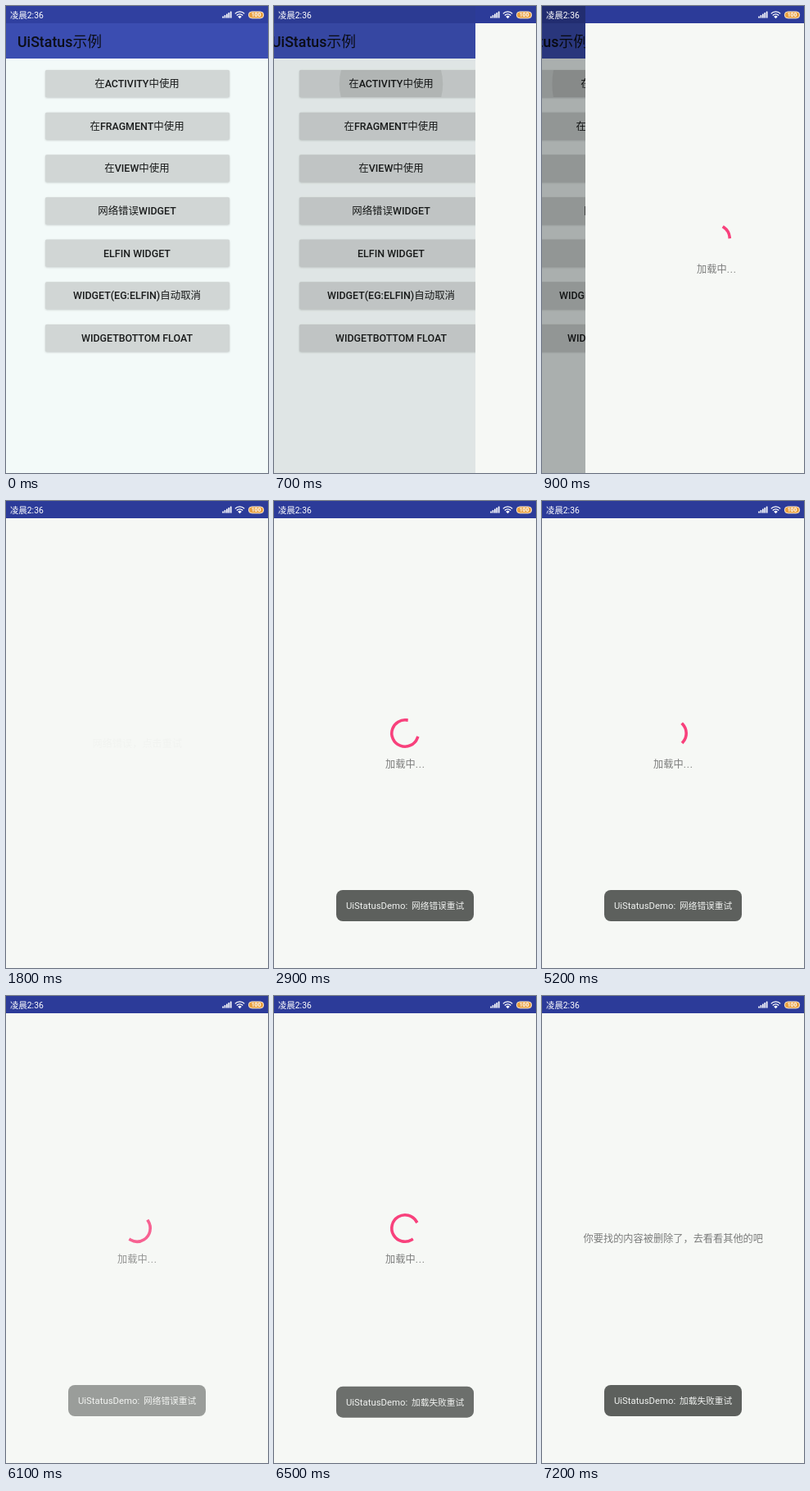
Write an HTML page that moves like this. It is 320 px wide and 569 px high and loops after 8 s.

```html
<!DOCTYPE html>
<html lang="zh-CN">
<head>
<meta charset="utf-8">
<title>UiStatus</title>
<style>
  html, body { margin: 0; width: 100%; height: 100%; overflow: hidden; background: #f6f8f5; }
  svg { display: block; width: 100vw; height: 100vh; }
  text { font-family: Roboto, "Noto Sans CJK SC", "Noto Sans CJK", sans-serif; white-space: pre; }
  .mid { text-anchor: middle; }
  .thin { font-weight: 400; }
  .btn { font-size: 12.44px; font-weight: 500; fill: #1a1c1c; }
  .note { font-size: 12.2px; fill: #7c7d7c; text-anchor: middle; }
  .dots { letter-spacing: .8px; }
  .toast text { font-size: 11.35px; fill: #f0f2f0; }
  .toast .zh { font-size: 10.7px; }
</style>
</head>
<body>
<svg viewBox="0 0 320 569" preserveAspectRatio="none">
  <defs>
    <clipPath id="firstBtn"><rect x="48" y="78" width="225" height="33" rx="1.5"/></clipPath>
    <filter id="soft" x="-5%" y="-20%" width="110%" height="150%"><feGaussianBlur stdDeviation="1"/></filter>
  </defs>

  <g id="list">
    <rect width="400" height="569" fill="#f3faf9"/>
    <rect width="400" height="21" fill="#3040a0"/>
    <rect y="21" width="400" height="43" fill="#3b4db1"/>
    <text x="14" y="49.5" font-size="17.78" font-weight="500" fill="#0c0e18">UiStatus<tspan class="thin">示例</tspan></text>
    <g id="buttons"></g>
    <g clip-path="url(#firstBtn)"><circle id="ripple" cx="160" cy="95" fill="#000"/></g>
  </g>
  <rect id="dim" width="320" height="569"/>

  <g id="page">
    <rect width="320" height="569" fill="#f6f8f5"/>
    <rect width="320" height="21" fill="#2c3b99"/>
    <g id="loading">
      <circle id="arc" r="16.2" pathLength="360" fill="none" stroke="#f8417c" stroke-width="3.6" stroke-linecap="square"/>
      <text class="note" x="160.4" y="325.3">加载中<tspan class="dots">...</tspan></text>
    </g>
    <text id="note" class="note" x="160.3" y="300"></text>
  </g>

  <g id="status" fill="#fff">
    <text x="5" y="14.8" font-size="10.4">凌晨2:36</text>
    <g id="bars"></g>
    <path d="M279.8 9.4a7.6 7.6 0 0 1 11.4 0M281.8 11.5a5 5 0 0 1 7.4 0" fill="none" stroke="#fff" stroke-width="1.4"/>
    <path d="M283.2 12.9a3.2 3.2 0 0 1 4.6 0l-2.3 2.3z"/>
    <rect x="296.3" y="6.9" width="18.4" height="8" rx="4" fill="#e9a140" stroke="#f6e6d0" stroke-width="1"/>
    <text class="mid" x="305.5" y="13.4" font-size="6.8" font-weight="700">100</text>
  </g>

  <g id="toast" class="toast">
    <rect x="76" y="474" width="168" height="38" rx="8" fill="#5d605d"/>
    <text x="88" y="497">UiStatusDemo:</text>
    <text id="toastText" class="zh" x="168" y="497"></text>
  </g>
  <circle id="touch" r="10.3" fill="#fff" fill-opacity=".75" stroke="#cfd1e6" stroke-width="1.3"/>
</svg>

<script>
const LOOP = 8000, FADE = 350;
const $ = id => document.getElementById(id);
const set = (id, attrs) => { for (const k in attrs) $(id).setAttribute(k, attrs[k]); };
const clamp = v => Math.min(1, Math.max(0, v));
const span = (t, start, length) => clamp((t - start) / length);
const smooth = p => (1 - Math.cos(Math.PI * p)) / 2;

const labels = ['在ACTIVITY中使用', '在FRAGMENT中使用', '在VIEW中使用', '网络错误WIDGET',
  'ELFIN WIDGET', 'WIDGET(EG:ELFIN)自动取消', 'WIDGETBOTTOM FLOAT'];
const thinHan = label => label.replace(/[\u4e00-\u9fff]+/g, '<tspan class="thin">$&</tspan>');
$('buttons').innerHTML = labels.map((label, i) => {
  const y = 78 + i * 51.65;
  return `<rect x="48" y="${y + .8}" width="225" height="33.2" rx="2" fill="#8d9291" opacity=".45" filter="url(#soft)"/>
    <rect x="48" y="${y}" width="225" height="33" rx="1.5" fill="#d1d6d5"/>
    <text class="btn mid" x="160" y="${y + 21.1}">${thinHan(label)}</text>`;
}).join('');
$('bars').innerHTML = [0, 1, 2, 3, 4].map(i =>
  `<rect x="${264.2 + i * 2.4}" y="${12.6 - i * 1.5}" width="1.7" height="${2 + i * 1.5}"/>`).join('');

// Each session: loading begins, then the result replaces it.
const sessions = [
  { start: 750, end: 1760, note: '网络错误，点击重试' },
  { start: 2420, end: 3440, note: '加载失败，点击重试' },
  { start: 4240, end: 5250, note: '这里空空如也，去看看其他的吧' },
  { start: 5850, end: 6850, note: '你要找的内容被删除了，去看看其他的吧' }
];
const toasts = [
  { start: 2440, end: 5950, text: '网络错误重试' },
  { start: 6310, end: LOOP, text: '加载失败重试' }
];
const touches = [
  { at: 300, until: 430, x: 160, y: 95 },
  ...sessions.slice(1).map(s => ({ at: s.start - 60, until: s.start + 40, x: 133.7, y: 288.8 }))
];

// cubic-bezier(.4, 0, .2, 1), solved by bisection
function standard(x) {
  let lo = 0, hi = 1, s = .5;
  for (let i = 0; i < 20; i++) {
    s = (lo + hi) / 2;
    const r = 1 - s;
    if (1.2 * r * r * s + .6 * r * s * s + s * s * s < x) lo = s; else hi = s;
  }
  return s * s * (3 - 2 * s);
}

// Indeterminate ring: the head runs ahead, then the tail catches up.
function spin(t) {
  const p = (t % 1333) / 1333;
  const head = 270 * standard(clamp(2 * p));
  const tail = 270 * standard(clamp(2 * p - 1));
  const turn = -90 + t * 720 / 4444 + 90 * p + tail + 360 * Math.floor(t / 1333);
  set('arc', {
    'stroke-dasharray': `${head - tail} 720`,
    transform: `translate(160 283) rotate(${turn})`
  });
}

function drawSlide(t) {
  const p = 1 - Math.pow(1 - span(t, 650, 450), 2.2);
  set('page', { transform: `translate(${Math.round(320 * (1 - p))} 0)` });
  set('list', { transform: `translate(${Math.round(-73 * p)} 0)` });
  set('dim', { opacity: .36 * p });
  const press = span(t, 330, 600);
  set('ripple', { r: 20 + 70 * press, opacity: t < 330 ? 0 : .08 });
}

function drawSession(t) {
  const i = Math.max(0, sessions.findLastIndex(s => t >= s.start));
  const s = sessions[i];
  const busy = t < s.end;
  set('loading', { opacity: busy ? (i ? smooth(span(t, s.start, FADE)) : 1) : 0 });
  set('note', { opacity: busy ? 0 : smooth(span(t, s.end, FADE)) });
  $('note').textContent = s.note;
  spin(Math.max(0, t - s.start));
}

function drawToast(t) {
  const toast = toasts.findLast(a => t >= a.start);
  if (!toast) return set('toast', { opacity: 0 });
  const enter = 1 - Math.pow(1 - span(t, toast.start, 280), 2);
  set('toast', {
    opacity: enter * (1 - span(t, toast.end, 375)),
    transform: `translate(0 ${17 * (1 - enter)})`
  });
  $('toastText').textContent = toast.text;
}

function drawTouch(t) {
  const hit = touches.find(a => t >= a.at && t < a.until);
  set('touch', hit ? { cx: hit.x, cy: hit.y, opacity: 1 } : { opacity: 0 });
}

function render(t) {
  drawSlide(t);
  drawSession(t);
  drawToast(t);
  drawTouch(t);
}

const begin = performance.now();
function tick() {
  render((performance.now() - begin) % LOOP);
  requestAnimationFrame(tick);
}
tick();
</script>
</body>
</html>
```
